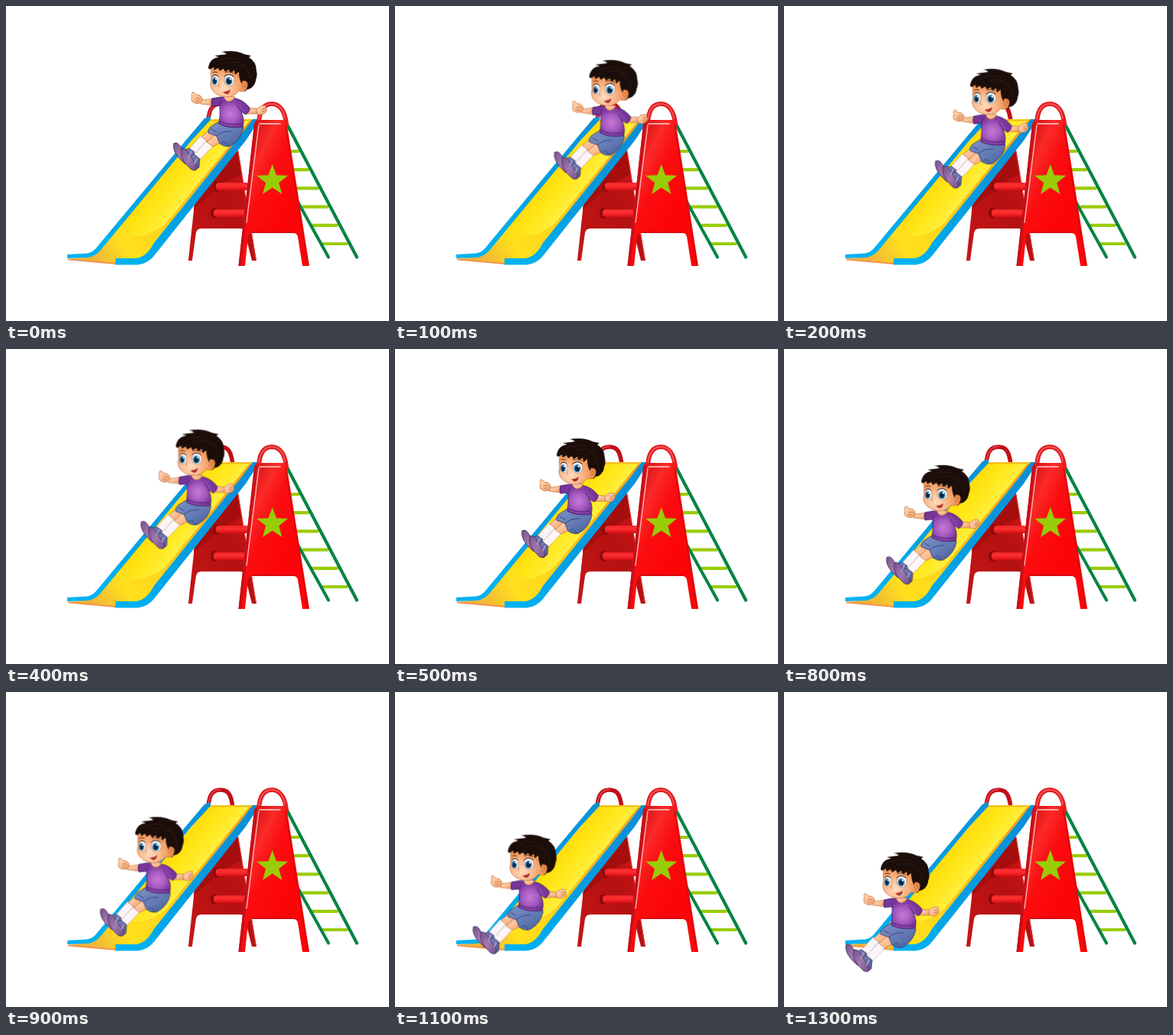
An HTML page that plays this animation: 500x412 px, repeating every 1400 ms.

```html
<!DOCTYPE html>
<html lang="en">
<head>
<meta charset="utf-8">
<title>Boy on a slide</title>
<style>
  html, body { margin: 0; width: 100%; height: 100%; overflow: hidden; background: #fff; }
  svg { display: block; width: 100%; height: 100%; }
  path, line { stroke-linecap: round; stroke-linejoin: round; }
  .line { fill: none; }
  .skin { fill: url(#skin); stroke: #b5602b; stroke-width: .6; }
  .face { fill: url(#cheek); stroke: #b5602b; stroke-width: .6; }
  .crease { fill: none; stroke: #b5602b; stroke-width: .7; }
  .shirt { fill: url(#shirt); stroke: #3d1760; stroke-width: .8; }
  .shorts { fill: url(#shorts); stroke: #2c3765; stroke-width: .8; }
  .sock { fill: #fbf4f8; stroke: #b5a5ad; stroke-width: .6; }
  .shoe { fill: url(#shoe); stroke: #382c58; stroke-width: .7; }
  .sole { fill: url(#sole); stroke: #443062; stroke-width: .8; }
  .hair { fill: #1b0e0a; }
  #boy { animation: ride 1400ms steps(14, end) infinite; }
  @keyframes ride {
    from { transform: translate(0, 0); }
    to { transform: translate(-148.6px, 162.4px); }
  }
</style>
</head>
<body>
<svg viewBox="0 0 500 412">
  <defs>
    <linearGradient id="bed" gradientUnits="userSpaceOnUse" x1="190" y1="237" x2="237" y2="276">
      <stop offset="0" stop-color="#ffdc08"/><stop offset=".4" stop-color="#ffe81c"/>
      <stop offset="1" stop-color="#fff25c"/>
    </linearGradient>
    <linearGradient id="foot" gradientUnits="userSpaceOnUse" x1="210" y1="270" x2="112" y2="330">
      <stop offset="0" stop-color="#ffd21a"/><stop offset=".6" stop-color="#ffe01c"/>
      <stop offset="1" stop-color="#f0b43a"/>
    </linearGradient>
    <linearGradient id="lip" gradientUnits="userSpaceOnUse" x1="320" y1="150" x2="200" y2="295">
      <stop offset="0" stop-color="#ee9c1c"/><stop offset=".55" stop-color="#f6b41c"/>
      <stop offset="1" stop-color="#ffd21a"/>
    </linearGradient>
    <linearGradient id="rail" gradientUnits="userSpaceOnUse" x1="300" y1="150" x2="150" y2="330">
      <stop offset="0" stop-color="#0c8fd8"/><stop offset=".6" stop-color="#049fe2"/>
      <stop offset="1" stop-color="#00b2f2"/>
    </linearGradient>
    <linearGradient id="front" gradientUnits="userSpaceOnUse" x1="318" y1="190" x2="385" y2="222">
      <stop offset="0" stop-color="#e21a1c"/><stop offset=".2" stop-color="#fa2a28"/>
      <stop offset=".5" stop-color="#fb0d10"/><stop offset="1" stop-color="#fc0509"/>
    </linearGradient>
    <linearGradient id="back" x1="1" y1="0" x2=".1" y2="1">
      <stop offset="0" stop-color="#d3161a"/><stop offset=".5" stop-color="#b51111"/>
      <stop offset="1" stop-color="#c41516"/>
    </linearGradient>
    <linearGradient id="bar" x1="0" y1="0" x2="0" y2="1">
      <stop offset="0" stop-color="#f0262b"/><stop offset=".4" stop-color="#fd3030"/>
      <stop offset="1" stop-color="#d80d14"/>
    </linearGradient>
    <linearGradient id="skin" x1="0" y1="0" x2="1" y2="1">
      <stop offset="0" stop-color="#ffd9b8"/><stop offset=".5" stop-color="#fcc298"/>
      <stop offset="1" stop-color="#ee9860"/>
    </linearGradient>
    <radialGradient id="cheek" gradientUnits="userSpaceOnUse" cx="283" cy="107" r="29">
      <stop offset="0" stop-color="#ffdcbc"/><stop offset=".4" stop-color="#fcc096"/>
      <stop offset="1" stop-color="#ee8f4e"/>
    </radialGradient>
    <radialGradient id="shirt" gradientUnits="userSpaceOnUse" cx="293" cy="141" r="22">
      <stop offset="0" stop-color="#c57ad4"/><stop offset=".45" stop-color="#a95cc2"/>
      <stop offset=".75" stop-color="#8440a6"/><stop offset="1" stop-color="#763599"/>
    </radialGradient>
    <linearGradient id="shorts" x1="0" y1="0" x2="1" y2="1">
      <stop offset="0" stop-color="#8092c4"/><stop offset=".6" stop-color="#6179b4"/>
      <stop offset="1" stop-color="#455991"/>
    </linearGradient>
    <linearGradient id="shoe" x1="0" y1="0" x2="1" y2="1">
      <stop offset="0" stop-color="#8b8cc0"/><stop offset="1" stop-color="#4a568e"/>
    </linearGradient>
    <linearGradient id="sole" x1="0" y1="0" x2="1" y2="1">
      <stop offset="0" stop-color="#75518c"/><stop offset=".5" stop-color="#a27aae"/>
      <stop offset="1" stop-color="#71508c"/>
    </linearGradient>
  </defs>

  <g id="ladder"></g>

  <!-- far legs and handle -->
  <path class="line" d="M264 151C265 134 270 128 280 128S294 134 296 151" stroke="#c20f17" stroke-width="5.500"/>
  <path class="line" d="M264 146C267 132 272 127.500 280 127.500" stroke="#e5454a" stroke-width="1.500"/>
  <path d="M301 180L327 333H321L312 297Q311 291 306 291H255Q249 291 248 297L243 333H238L247 250Z" fill="url(#back)"/>
  <path d="M301 182L247 251L245 266L284 232L308 220Z" fill="#a50e0d"/>
  <path class="line" d="M303 190L326 331" stroke="#e3322f" stroke-width="1.200"/>
  <g id="bars"></g>

  <!-- slide -->
  <path d="M266 148H327L190 320Q182 331 168 331H143V337L80 331L106 328Q117 326 124 317Z" fill="url(#foot)"/>
  <path d="M266 149H320L209 284Q188 301 169 301Q156 299 160 287L146 290Z" fill="url(#bed)"/>
  <path d="M325 149L317 151L268 212L208 286L200 303L310 167Z" fill="url(#lip)"/>
  <path class="line" d="M267 149.500H323" stroke="#f0b323" stroke-width="1.500"/>
  <path class="line" d="M82 331.500L143 337" stroke="#f3954a" stroke-width="2"/>
  <path d="M267 144L259 147L237 173L119 315Q114 322 106 323.500L80 325V330L107 329Q117 327 123 320L242 176L267 149Z" fill="url(#rail)"/>
  <path d="M329 148H322L308 167L193 310Q184 328 170 330H143V338.500H172Q185 337 193 327L313 176L328 153Z" fill="url(#rail)"/>

  <!-- near legs and handle -->
  <path class="line" d="M330 153C331 135 337 128 347 128S364 137 366 154" stroke="#e51c22" stroke-width="6"/>
  <path class="line" d="M330 149C332 134 338 128 347 128S362 135 364 147" stroke="#f5605c" stroke-width="1.500"/>
  <path d="M328 149H363Q366 150 367 156L396 340H387L381 302Q380 297 375 297H322Q317 297 316 302L312 340H303.500L324 155Q325 150 328 149Z" fill="url(#front)"/>
  <path d="M327 150L324 155L303.500 340H307L328 154Z" fill="#c41119"/>
  <path class="line" d="M331 154H358" stroke="#ffd0cb" stroke-width="1.500"/>
  <path class="line" d="M330 156L314 283" stroke="#ffb4ad" stroke-width="1.400"/>
  <path class="line" d="M365 156L394 338M321 296H376" stroke="#c80c12" stroke-width="1.300"/>
  <path id="star" fill="#99cc08"/>

  <g id="boy">
    <!-- far arm -->
    <path class="skin" d="M271 121L258 123L254 122V128L271 130Z"/>
    <path class="skin" d="M244 113Q241 114 243 118Q241 121 243 125Q247 129 253 127Q257 125 256 120Q253 115 248 116Q247 113 244 113Z"/>
    <path class="crease" d="M247 121Q250 119 253 121M247 124L251 124"/>

    <!-- legs and shoes -->
    <path class="sock" d="M263 174L254 170L239 187L246 194Z"/>
    <path class="skin" d="M276 158Q267 157 262 165L255 171L263 177L276 170Z"/>
    <path class="shoe" d="M226 185L234 188L239 186L246 191L243 202L234 206Z"/>
    <path class="sole" d="M219 180Q224 176 229 186L239 202Q240 209 233 206Q216 191 219 180Z"/>
    <path class="sock" d="M271 182L261 177L245 195L252 202Z"/>
    <path class="skin" d="M286 166Q275 164 269 172L262 178L270 184L280 179Z"/>
    <path class="shoe" d="M236 193L240 196L246 194L253 200L252 211L247 215Z"/>
    <path class="sole" d="M229 187Q234 184 239 194L249 209Q249 217 242 214Q225 199 229 187Z"/>
    <path class="line" d="M242 190L239 197M249 200L246 206" stroke="#bdb9dd" stroke-width="1.200"/>

    <!-- shorts -->
    <path class="shorts" d="M278 151L267 158Q263 162 264 166L275 170L279 180Q286 185 293 183Q307 175 310 160L309 155Z"/>
    <path class="line" d="M275 170Q282 163 294 164M281 180Q285 174 290 183M268 161L275 165" stroke="#34457e" stroke-width="1"/>

    <!-- near arm -->
    <path class="skin" d="M309 133L328 134L331 141L313 141Z"/>
    <path class="skin" d="M327 135Q331 130 336 130Q340 130 339 133Q342 137 338 140Q333 144 328 141Z"/>
    <path class="crease" d="M334 135L338 134M334 138L338 137"/>

    <!-- shirt -->
    <path class="shirt" d="M280 119L269 121Q267 126 269 131L279 130Q280 143 278 154Q291 161 309 158Q312 149 307 138L313 142Q319 138 318 133Q310 123 300 121Z"/>
    <path class="line" d="M279 130L281 124M307 138L302 130M280 151Q292 157 308 154" stroke="#512071" stroke-width="1"/>
    <path class="skin" d="M284 117L299 119Q296 125 290 125Q285 123 284 117Z"/>

    <!-- head -->
    <path class="hair" d="M296 68L325 78L326 98Q324 107 316 108L312 112L308 107L298 98Z"/>
    <path class="face" d="M268 80Q267 91 268 97Q265 104 270 111Q275 117 286 119Q297 120 304 111Q313 114 315 106Q317 97 309 98L309 80Q288 70 268 80Z"/>
    <path class="crease" d="M308 106Q309 100 313 102Q313 106 309 108"/>
    <path class="hair" d="M264 81Q266 68 278 67Q273 65 272 65Q281 64 288 63Q285 60 281 60Q299 57 311 63L320 65L317 67Q327 73 327 85Q329 92 325 99Q322 109 314 109Q318 101 314 97Q308 95 308 102Q304 96 304 86L299 90L298 84L293 88L291 83L286 86L284 82L279 85L277 81L272 84L271 80L266 83Z"/>
    <path class="line" d="M278 72Q290 65 302 70M288 75Q305 70 315 80M306 77Q318 82 319 95" stroke="#33201a" stroke-width=".8"/>
    <ellipse cx="273.500" cy="97" rx="4.500" ry="7" fill="#fff" stroke="#8a5238" stroke-width=".5"/>
    <ellipse cx="291.500" cy="97" rx="6.500" ry="7.500" fill="#fff" stroke="#8a5238" stroke-width=".5"/>
    <ellipse cx="272.500" cy="98" rx="3.400" ry="5" fill="#3684b8"/>
    <ellipse cx="291" cy="98" rx="4.600" ry="5.300" fill="#3684b8"/>
    <ellipse cx="272.500" cy="98.500" rx="2.200" ry="3.300" fill="#0b2740"/>
    <ellipse cx="291" cy="98.500" rx="3" ry="3.600" fill="#0b2740"/>
    <circle cx="274" cy="95.500" r="1.100" fill="#fff"/>
    <circle cx="293" cy="95.500" r="1.300" fill="#fff"/>
    <path class="line" d="M269.500 92Q273 88 277 92M285 92Q290 87 297 92" stroke="#28140f"/>
    <path class="line" d="M270 87Q273 85 276 87M286 87Q292 84 297 88" stroke="#5a2b18"/>
    <path class="crease" d="M279 102Q275 105 279 106"/>
    <path d="M283 112Q288 113 293 109Q292 115 288 115.500Q285 115 283 112Z" fill="#b0302a"/>
  </g>
</svg>
<script>
  const $ = id => document.getElementById(id);

  function add(parent, tag, attrs) {
    const el = document.createElementNS("http://www.w3.org/2000/svg", tag);
    for (const key in attrs) el.setAttribute(key, attrs[key]);
    parent.append(el);
  }

  function stroke(parent, x1, y1, x2, y2, color, width) {
    add(parent, "line", { x1, y1, x2, y2, stroke: color, "stroke-width": width });
  }

  // Ladder: rungs run between two slanted rails.
  const railX = (x, y) => x + (y - 155) * 0.523;
  for (let i = 0; i < 6; i++) {
    const y = 190 + i * 24.2;
    stroke($("ladder"), railX(330, y) + 2, y, railX(363, y), y, "#99cc08", 4.2);
  }
  stroke($("ladder"), 331, 166, 421, 328.5, "#078343", 4);
  stroke($("ladder"), 367, 155, 458, 328.5, "#078343", 4.2);

  // Cross bars between the legs.
  for (const [x, y, w] of [[274, 231, 43], [271, 266, 42]]) {
    add($("bars"), "ellipse", { cx: x + 1, cy: y + 5, rx: 5, ry: 7, fill: "#8e0909" });
    add($("bars"), "rect", { x, y, width: w, height: 10, rx: 4, fill: "url(#bar)" });
  }

  let star = "";
  for (let i = 0; i < 10; i++) {
    const r = i % 2 ? 9 : 21.5, a = (i * 36 - 90) * Math.PI / 180;
    star += (i ? "L" : "M") + (347.7 + r * Math.cos(a)) + " " + (228.5 + r * Math.sin(a));
  }
  $("star").setAttribute("d", star + "Z");
</script>
</body>
</html>
```
